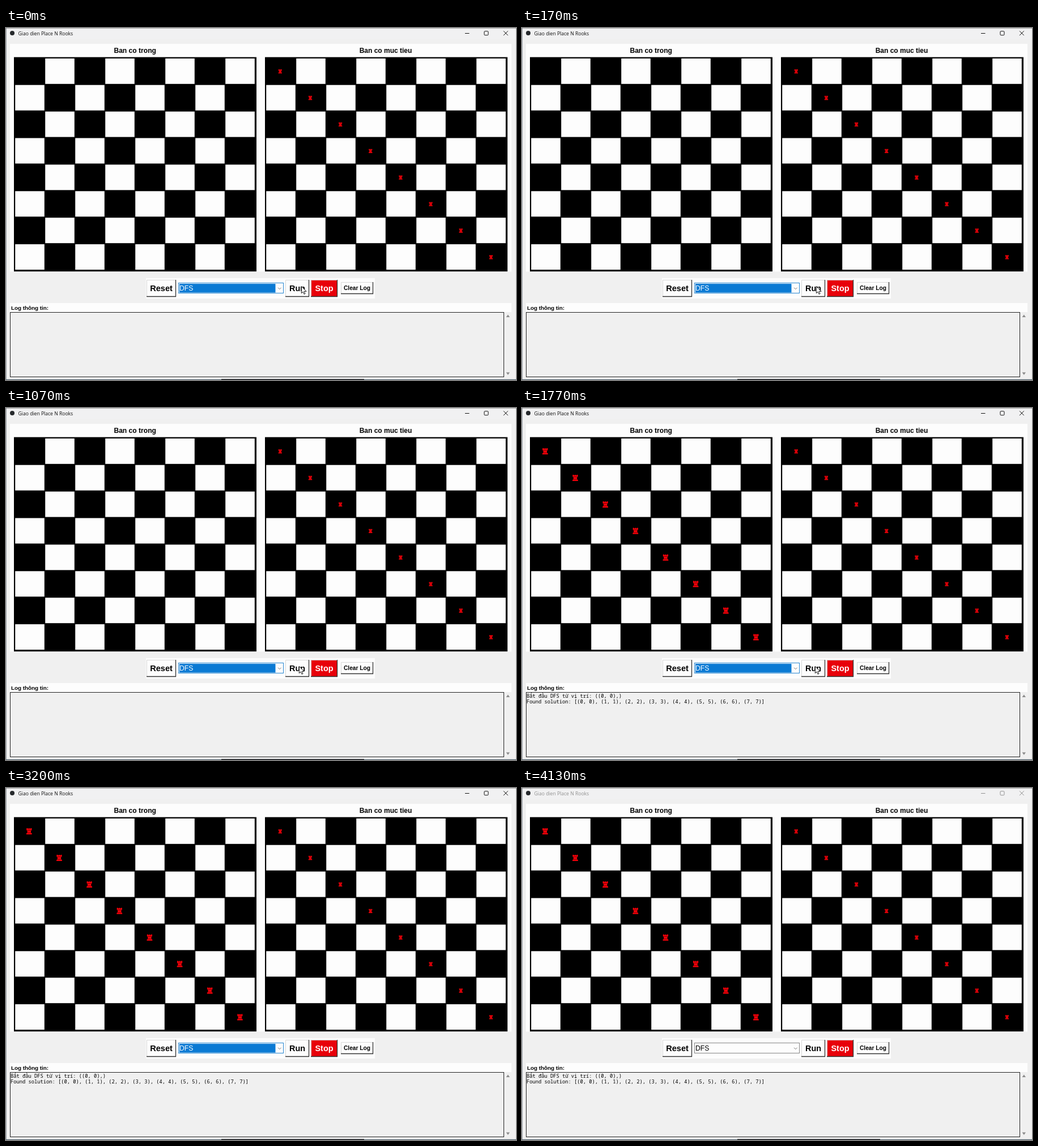
Animation, 900 px wide and 622 px high, one loop 4260 ms. Source, as an HTML page:

```html
<!DOCTYPE html>
<html lang="vi">
<head>
<meta charset="utf-8">
<title>Place N Rooks</title>
<style>
html, body { margin: 0; width: 100%; height: 100%; overflow: hidden; background: #f0f0f0; }
svg { display: block; width: 100vw; height: 100vh; }
text { font-family: "Liberation Sans", Arial, sans-serif; white-space: pre; }
.b { font-weight: bold; }
.title { font: 8.6px "Open Sans", "Noto Sans", sans-serif; }
.log { font: 8.75px "Noto Sans Mono", "DejaVu Sans Mono", monospace; }
</style>
</head>
<body>
<svg id="stage" viewBox="0 0 900 622" preserveAspectRatio="none"></svg>
<script>
const LOOP = 4260;
const NS = "http://www.w3.org/2000/svg";
const stage = document.getElementById("stage");

function add(tag, attrs, parent = stage) {
  const el = document.createElementNS(NS, tag);
  for (const k in attrs) el.setAttribute(k, attrs[k]);
  parent.appendChild(el);
  return el;
}
const rect = (x, y, width, height, fill, more) => add("rect", { x, y, width, height, fill, ...more });
const path = (d, attrs, parent) => add("path", { d, fill: "none", ...attrs }, parent);
function label(str, x, y, size, attrs) {
  const el = add("text", { x, y, "font-size": size, fill: "#000", ...attrs });
  el.textContent = str;
  return el;
}

// Rook with dark seams, centred on 0,0
const ROOK = "M-4.6-5.5h2.4v1.2h1.2v-1.2h2v1.2h1.2v-1.2h2.4v3.3l-1.4 1v3.5l1.2 1.2h.5v2h-9.8v-2h.5l1.2-1.2v-3.5l-1.4-1z";
function rook(x, y, scale) {
  const g = add("g", { transform: `translate(${x} ${y}) scale(${scale})` });
  path(ROOK, { fill: "#f40009" }, g);
  path("M-3.2-1.9h6.4M-3.2 2.6h6.4", { stroke: "#400", "stroke-width": 0.7 }, g);
  return g;
}

function board(x, scale) {
  rect(x, 51.5, 428, 378.7, "#000");
  for (let r = 0; r < 8; r++)
    for (let c = 0; c < 8; c++)
      if ((r + c) % 2) rect(x + 2.2 + 53 * c, 53.8 + 46.9 * r, 51.6, 45, "#fdfdfd");
  return Array.from({ length: 8 }, (_, i) => rook(x + 26.8 + 53.15 * i, 76.6 + 46.9 * i, scale));
}

function button(str, x, y, w, h, size, fill = "#fdfdfd", ink = "#000") {
  rect(x, y, w, h, fill);
  path(`M${x + .5} ${y + h}V${y + .5}H${x + w}`, { stroke: "#d8d8d8" });
  path(`M${x} ${y + h - .5}H${x + w - .5}V${y}`, { stroke: "#333", "stroke-width": 1.3 });
  label(str, x + w / 2, y + h / 2 + size * .34, size, { class: "b", fill: ink, "text-anchor": "middle" });
}

// Window frame and title bar
rect(0, 0, 900, 622, "#f0f0f0");
rect(0, 0, 900, 19, "#f1f1f2");
rect(0, 0, 900, .6, "#777");
rect(0, 0, .8, 622, "#8a949c");
rect(0, 620.8, 900, 1.2, "#50606c");
rect(380, 620.4, 252, 1.6, "#16181c");
add("circle", { cx: 11, cy: 9, r: 4, fill: "#26292c" });
const caption = add("g", { fill: "none", stroke: "#111" });
const title = label("Giao dien Place N Rooks", 21.5, 12.6, 8.6, { class: "title" });
path("M810 9.5h7.5M878 5.3l7.8 7.8M885.8 5.3l-7.8 7.8", {}, caption);
add("rect", { x: 844, y: 5.7, width: 7, height: 7, rx: 1.2 }, caption);

// Boards
rect(7, 28, 885, 402.5, "#fdfdfd");
label("Ban co trong", 227.7, 44.3, 12.1, { class: "b", "text-anchor": "middle" });
label("Ban co muc tieu", 670, 44.3, 12, { class: "b", "text-anchor": "middle" });
const placed = board(14, 1);
board(457, .66);

// Controls
rect(247, 442, 404, 36, "#fdfdfd");
button("Reset", 248, 445, 52, 30, 14.6);
button("Run", 493, 445, 42, 30, 14.4);
button("Stop", 538, 445, 47, 30, 14.4, "#e8000a", "#fff");
button("Clear Log", 591, 449, 57, 21, 10.2);
const combo = rect(304.5, 450.5, 185, 18, "#fdfdfd", { stroke: "#0078d7" });
const choice = rect(306, 452, 169.5, 15.5, "#0a7ad4");
const value = label("DFS", 306, 464.4, 12.2);
path("M480 458.8l2.8 2.8 2.8-2.8", { stroke: "#777" });

// Log
rect(7, 486, 885, 16, "#fdfdfd");
label("Log thông tin:", 9, 497.6, 9.85, { class: "b" });
rect(7.5, 502.5, 871, 114, "#f0f0f0", { stroke: "#222" });
path("M882.6 511l3.2-4.5 3.2 4.5zM882.6 608.5l3.2 4.5 3.2-4.5z", { fill: "#8c8c8c" });
const diagonal = [...Array(8).keys()].map(i => `(${i}, ${i})`).join(", ");
const started = label("Bắt đầu DFS từ vị trí: ((0, 0),)", 8, 512, 8.75, { class: "log" });
const found = label(`Found solution: [${diagonal}]`, 8, 522.4, 8.75, { class: "log" });

const cursor = path("M0 0v12.2l2.8-2.6 1.9 4.3 2-.9-1.9-4.1h3.9z", {
  fill: "#fff", stroke: "#000", "stroke-width": .9, "stroke-linejoin": "round"
});

const clamp = v => Math.max(0, Math.min(1, v));
const show = (el, on) => el.setAttribute("visibility", on ? "visible" : "hidden");

function pointer(t) {
  if (t < 2270) {
    const p = clamp((t - 30) / 500);
    return [521.3 - 4 * (1 - (1 - p) ** 2), 456.5];
  }
  if (t < 2300) return [518, 456.5];
  if (t < 2700) return [518.4, 456.5];
  if (t < 2730) return [529, 458];
  if (t < 3000) return [537, 459.5];
  const p = clamp((t - 2960) / 240);
  return [537 + 30 * p, 459.5 + 170 * p];
}

function draw(t) {
  placed.forEach((el, i) => show(el, t >= 1500 + i * 270 / 7));
  show(started, t >= 1500);
  show(found, t >= 1770);

  const [x, y] = pointer(t);
  cursor.setAttribute("transform", `translate(${x} ${y})`);
  show(cursor, t < 3200);

  const focused = t < 4000;
  const grey = Math.round(17 + 128 * clamp((t - 3970) / 160));
  const ink = `rgb(${grey},${grey},${grey})`;
  title.setAttribute("fill", ink);
  caption.setAttribute("stroke", ink);
  show(choice, focused);
  value.setAttribute("fill", focused ? "#fff" : "#000");
  combo.setAttribute("stroke", focused ? "#2787d2" : "#858585");
}

const begin = performance.now();
function tick() {
  draw((performance.now() - begin) % LOOP);
  requestAnimationFrame(tick);
}
tick();
</script>
</body>
</html>
```
